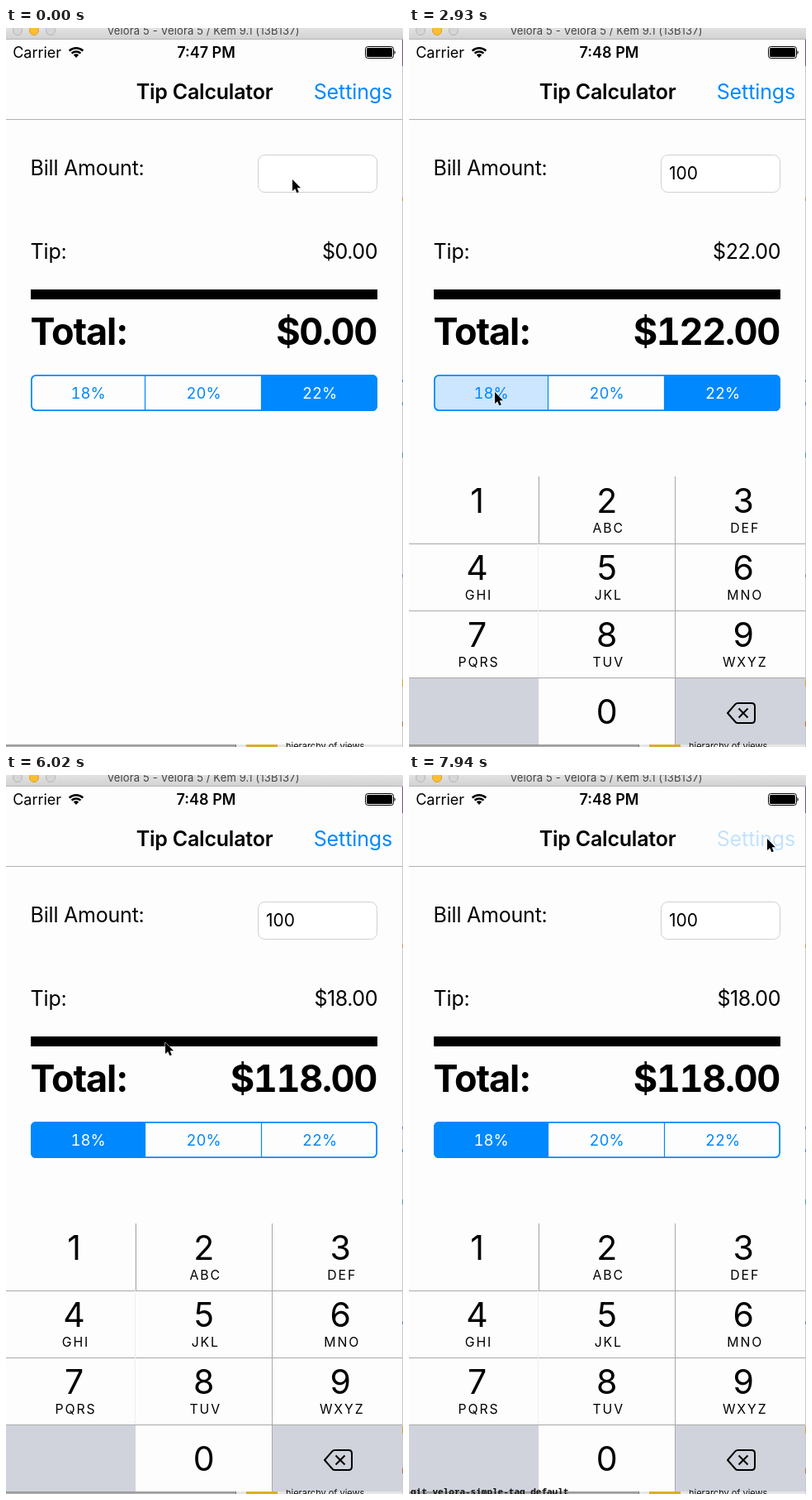
An HTML page for the animation above (8000 ms loop, 481 px wide and 869 px high).

```html
<!DOCTYPE html>
<html lang="en">
<head>
<meta charset="utf-8">
<title>Tip Calculator</title>
<style>
  html, body { margin: 0; width: 100%; height: 100%; overflow: hidden; background: #fdfdfd; }
  svg { display: block; width: 100%; height: 100%; }
  text { font-family: Inter, "Open Sans", sans-serif; white-space: pre; }
  .even { font-feature-settings: "tnum"; }
  .mono { font-family: "Noto Sans Mono", monospace; font-weight: 600; }
</style>
</head>
<body>
<svg id="stage" viewBox="0 0 481 869" xmlns="http://www.w3.org/2000/svg">
  <defs>
    <linearGradient id="chrome" x2="0" y2="1">
      <stop offset="0" stop-color="#e2e2e2"/><stop offset="1" stop-color="#d2d2d2"/>
    </linearGradient>
    <linearGradient id="shade" x2="0" y2="1">
      <stop offset="0" stop-color="#8d8d8d"/><stop offset="1" stop-color="#b9b9b9"/>
    </linearGradient>
    <clipPath id="segClip"><rect x="30" y="419" width="420" height="44" rx="6"/></clipPath>
    <clipPath id="phoneClip"><rect width="480" height="866"/></clipPath>
  </defs>
  <rect width="481" height="869" fill="#fdfdfd"/>
  <g id="base"></g>
  <g id="segments" clip-path="url(#segClip)"></g>
  <g fill="none" stroke="#0088ff">
    <rect x="30.9" y="419.9" width="418.2" height="42.2" rx="5.5" stroke-width="1.8"/>
    <path d="M168.5 420V462M309.500 420V462" stroke-width="1.2"/>
  </g>
  <g clip-path="url(#phoneClip)"><g id="pad"></g></g>
  <g id="edge"></g>
  <path id="pointer" d="M0 0V14L3.2 11.2L5.4 16.2L7.8 15.2L5.7 10.3H10Z" fill="#000" stroke="#fff" paint-order="stroke"/>
</svg>
<script>
const LOOP = 8000, STEP = 147, BLUE = '#0088ff', FADE_BLUE = '#00a2ff', KEY_GRAY = '#d0d3db';
const $ = id => document.getElementById(id);

function add(parent, tag, attrs, content) {
  const el = document.createElementNS('http://www.w3.org/2000/svg', tag);
  for (const k in attrs) el.setAttribute(k, attrs[k]);
  if (content) el.textContent = content;
  return parent.appendChild(el);
}
const rect = (p, x, y, width, height, fill, more) => add(p, 'rect', { x, y, width, height, fill, ...more });
const path = (p, d, stroke, more) => add(p, 'path', { d, stroke, fill: 'none', ...more });
const label = (p, x, y, size, content, more) => add(p, 'text', { x, y, 'font-size': size, ...more }, content);
const middle = { 'text-anchor': 'middle' }, end = { 'text-anchor': 'end' };

// Window chrome and status bar
const base = $('base');
rect(base, 0, 0, 481, 13, 'url(#chrome)');
rect(base, 0, 13, 481, 1, '#b4b4b4');
['#d6d6d6', '#fdbe30', '#d6d6d6'].forEach((fill, i) =>
  add(base, 'circle', { cx: 14 + 20 * i, cy: 3, r: 5.5, fill, stroke: i === 1 ? '#dfa023' : '#b5b5b5' }));
label(base, 239, 8, 13, 'Velora 5 - Velora 5 / Kem 9.1 (13B137)', { ...middle, fill: '#444', 'letter-spacing': 0.13 });
label(base, 8.2, 36, 18, 'Carrier');
path(base, 'M76.7 27.6A12 12 0 0 1 93.3 27.6M79.6 30.6A8 8 0 0 1 90.4 30.6', '#000', { 'stroke-width': 2.6 });
add(base, 'path', { d: 'M81.8 32.6A4.6 4.6 0 0 1 88.2 32.6L85 36Z' });
const clock = label(base, 242.5, 36, 18, '', { ...middle, 'font-weight': 600 });
rect(base, 435.5, 22.5, 34, 14, 'none', { rx: 3, stroke: '#000' });
rect(base, 437, 24, 31, 11, '#000', { rx: 1.5 });
add(base, 'path', { d: 'M470.5 27Q473 29.5 470.5 32Z' });

// Navigation bar and form
label(base, 240.5, 86, 25, 'Tip Calculator', { ...middle, 'font-weight': 600, 'letter-spacing': -0.22 });
const settings = label(base, 468.2, 86, 25, 'Settings', { ...end, 'letter-spacing': -0.1 });
rect(base, 0, 110, 480, 1, '#b2b2b2');
label(base, 29.6, 178, 25, 'Bill Amount:', { 'letter-spacing': -0.22 });
rect(base, 305.5, 153.5, 144, 45, '#fff', { rx: 8, stroke: '#d0d0d0' });
const amount = label(base, 315, 183, 21, '');
const caret = rect(base, 315, 161, 2.6, 28, '#0a7cf0');
label(base, 29.6, 279, 25, 'Tip:', { 'letter-spacing': -0.2 });
const tip = label(base, 450, 279, 25, '', { ...end, 'letter-spacing': -0.45 });
rect(base, 30, 316, 420, 12, '#000');
label(base, 29.5, 383, 45, 'Total:', { 'font-weight': 700, 'letter-spacing': -1.1 });
const total = label(base, 449, 383, 45, '', { ...end, class: 'even', 'font-weight': 700, 'letter-spacing': -1.4 });

// Tip rates
const segments = [[30, 139, 99.5], [168.5, 141, 239.5], [309.5, 141, 380]].map(([x, w, cx], i) => {
  const text = 18 + 2 * i + '%', style = { ...middle, class: 'even' };
  return {
    fill: rect($('segments'), x, 419, w, 44, BLUE),
    blue: label($('segments'), cx, 448, 18.5, text, { ...style, fill: BLUE }),
    white: label($('segments'), cx, 448, 18.5, text, { ...style, fill: '#fff' })
  };
});

// Number pad
const pad = $('pad'), keys = {};
const letters = ['', '', 'ABC', 'DEF', 'GHI', 'JKL', 'MNO', 'PQRS', 'TUV', 'WXYZ'];
const colX = [0, 157, 322], colW = [157, 165, 158], colMid = [82.5, 239.8, 405.2];
rect(pad, 0, 542, 480, 324, '#fdfdfd');
rect(pad, 0, 785, 480, 81, KEY_GRAY);
for (let d = 1; d <= 10; d++) {
  const digit = d % 10, col = digit ? (d - 1) % 3 : 1, row = digit ? Math.floor((d - 1) / 3) : 3;
  const top = 542 + 81 * row;
  keys[digit] = rect(pad, colX[col], top, colW[col], 81, '#fdfdfd');
  label(pad, colMid[col], digit ? top + 44 : 841, 41, String(digit), middle);
  label(pad, colMid[col] + 2, top + 67.5, 15.8, letters[digit], { ...middle, 'letter-spacing': 1.9 });
}
path(pad, 'M0 623.5H480M0 704.5H480M0 785.5H480M322.5 542V866', '#a9a9ab');
path(pad, 'M156.5 542V785', '#eeeeee');
const firstLine = path(pad, 'M157.5 542V623', '#a9a9ab');
const zeroLine = path(pad, 'M157.5 786V866', '#a9a9ab');
path(pad, 'M386 828L395.5 817.2Q396.6 816 398.5 816H415Q419 816 419 820V836Q419 840 415 840H398.5Q396.6 840 395.5 838.8ZM399.5 822.5L410.5 833.5M410.5 822.5L399.5 833.5',
  '#000', { 'stroke-width': 2, 'stroke-linejoin': 'round' });

// Strips of the desktop behind the window
const edge = $('edge');
rect(edge, 0, 866, 279, 3, 'url(#shade)');
rect(edge, 279, 866, 202, 3, '#e6e6e6');
rect(edge, 278, 866, 1, 3, '#777');
rect(edge, 291, 866, 38, 3, '#d8ae2c');
label(edge, 339, 872, 11, 'hierarchy of views', { fill: '#111' });
const shell = label(edge, 2, 870, 11, 'git velora-simple-tag default', { class: 'mono', fill: '#111' });
rect(edge, 480, 14, 1, 855, '#c8cacf');
[[14, 32, '#7b4a86'], [205, 4, '#d98a2b'], [425, 3, '#4a7fd0'], [452, 4, '#4a7fd0'],
 [513, 6, '#3f9aa5'], [660, 4, '#6f8fc0'], [787, 9, '#d9a02b'], [838, 6, '#c06a3a']]
  .forEach(([y, h, fill]) => rect(edge, 480, y, 1, h, fill));

const pointerPath = [
  [0, 347, 183], [1, 345, 183], [2, 322, 240], [4, 182, 618], [6, 100, 600], [8, 76, 588], [10, 78, 588],
  [12, 206, 812], [13, 208, 814], [14, 208, 814], [15, 205, 740], [16, 196, 564], [18, 130, 458],
  [20, 104, 440], [22, 104, 440], [25, 204, 432], [26, 206, 432], [27, 210, 432], [30, 376, 436],
  [32, 376, 436], [35, 147, 444], [36, 110, 440], [38, 106, 440], [40, 120, 420], [42, 266, 226],
  [44, 280, 224], [46, 362, 205], [47, 362, 184], [49, 362, 182], [51, 390, 130], [53, 434, 78], [54, 434, 77]
];
const picks = [[0, 2], [21, 0], [26, 1], [31, 2], [37, 0]];
const typed = [[0, ''], [9, '1'], [12, '10'], [14, '100']];
const padDrops = [[0, 324], [2, 210], [3, 40], [4, 0], [42, 40], [43, 190], [44, 290], [45, 324], [49, 210], [50, 40], [51, 0]];
const blinkStarts = [[1], [9], [12], [14], [48]];
const caretX = [315, 325.5, 336.5, 349.5];

const latest = (list, n) => list.filter(k => k[0] <= n).pop();
const money = v => '$' + v.toFixed(2);
const show = (el, on) => el.setAttribute('visibility', on ? 'visible' : 'hidden');

function along(stops, n) {
  const i = stops.findIndex(k => k[0] >= n);
  if (i < 1) return stops[i ? stops.length - 1 : 0].slice(1);
  const a = stops[i - 1], b = stops[i], u = (n - a[0]) / (b[0] - a[0]);
  return [1, 2].map(j => a[j] + (b[j] - a[j]) * u);
}

// Fill, its opacity and the opacity of the white label
function segmentLook(i, n) {
  const [at, chosen] = latest(picks, n), fading = at > 0 && n === at;
  if (i === chosen) return fading ? [FADE_BLUE, 1, 0.6] : [BLUE, 1, 1];
  if (fading && i === latest(picks, at - 1)[1]) return [FADE_BLUE, 0.34, 0];
  const pressed = picks.some(p => p[0] === n + 1 && p[1] === i);
  return [BLUE, pressed ? 0.2 : 0, 0];
}

function draw(ms) {
  const n = Math.min(54, Math.floor((ms + 14) / STEP));
  const bill = latest(typed, n)[1], rate = 0.18 + 0.02 * latest(picks, n)[1];

  clock.textContent = n < 20 ? '7:47 PM' : '7:48 PM';
  amount.textContent = bill;
  tip.textContent = money(bill * rate);
  total.textContent = money(bill * (1 + rate));
  settings.setAttribute('fill', n === 54 ? '#c3e2fb' : BLUE);

  const focused = (n >= 1 && n < 42) || n >= 48;
  show(caret, focused && (n - latest(blinkStarts, n)[0]) % 7 < 4);
  caret.setAttribute('x', caretX[bill.length]);

  segments.forEach((s, i) => {
    const [color, alpha, white] = segmentLook(i, n);
    s.fill.setAttribute('fill', color);
    s.fill.setAttribute('opacity', alpha);
    s.white.setAttribute('opacity', white);
    s.blue.setAttribute('opacity', white ? 0 : 1);
    s.blue.setAttribute('fill', color);
  });

  const zeroDown = n >= 12 && n <= 14;
  keys[1].setAttribute('fill', n === 9 || n === 10 ? KEY_GRAY : '#fdfdfd');
  keys[0].setAttribute('fill', zeroDown ? KEY_GRAY : '#fdfdfd');
  show(firstLine, n >= 9);
  show(zeroLine, zeroDown);
  const drop = latest(padDrops, n)[1];
  pad.setAttribute('transform', `translate(0 ${drop})`);
  pad.style.display = drop < 324 ? '' : 'none';

  show(shell, n >= 49);
  $('pointer').setAttribute('transform', `translate(${along(pointerPath, n).join(' ')})`);
}

const start = performance.now();
function tick() {
  draw((performance.now() - start) % LOOP);
  requestAnimationFrame(tick);
}
tick();
</script>
</body>
</html>
```
